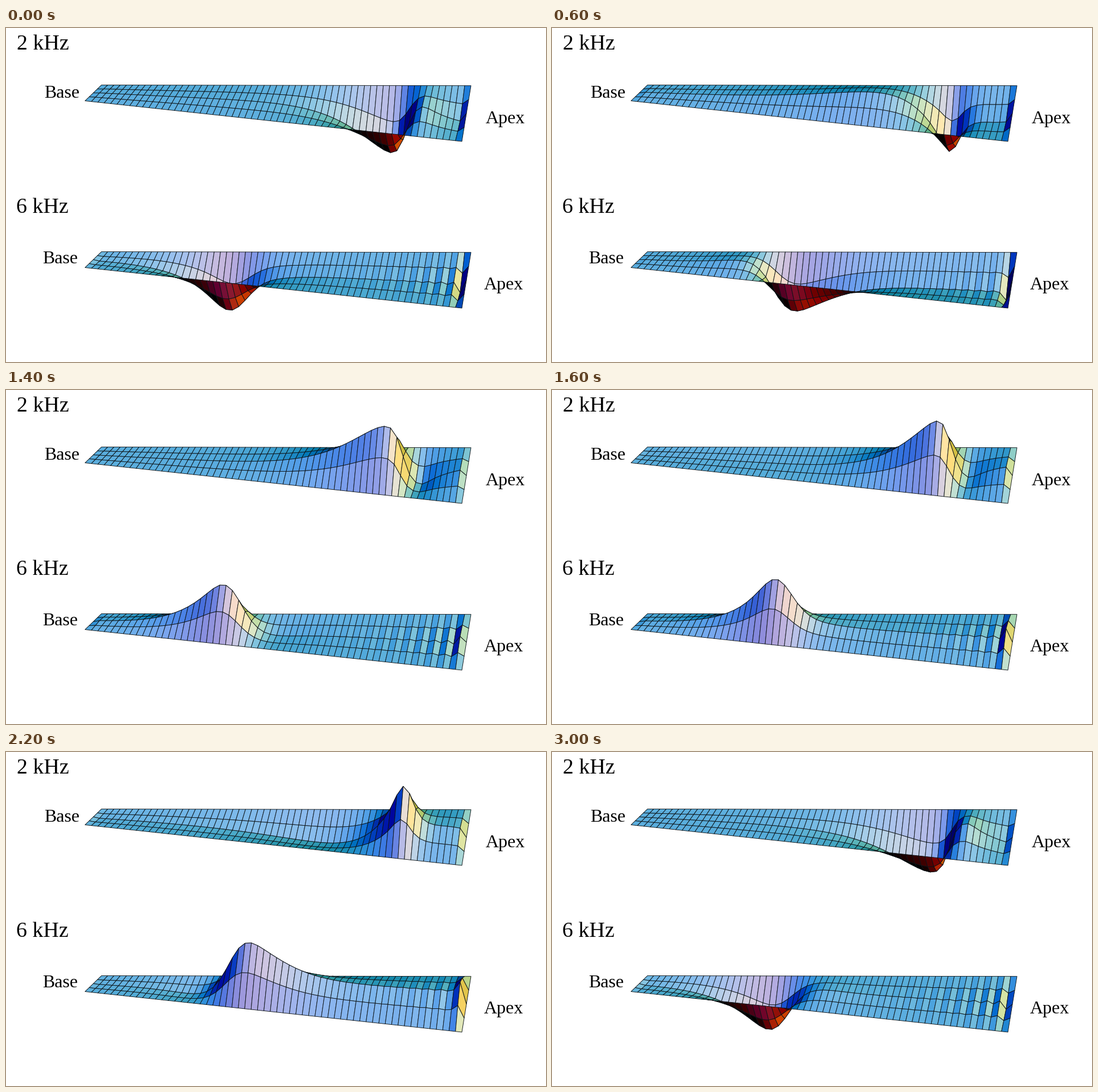
These frames come from a looping animation (950x589 px, 3.2 s). A matplotlib script:

```python
import numpy as np
import matplotlib.pyplot as plt
from matplotlib.animation import FuncAnimation
from matplotlib.collections import PolyCollection

W, H, DPI = 950, 589, 64
FRAMES, STEP = 16, 200
PERIOD = FRAMES * STEP
PX = 72 / DPI                      # points per pixel

COLS, ROWS = 59, 4
FLAT_DEPTH, LIFT_DEPTH = 1.4, 0.2  # depth gained per pixel down / per pixel of lift

# Red, green and blue lights in camera axes (right, up, towards the viewer)
LIGHTS = np.array([[0.80, -0.10, 0.75],
                   [0.55, 0.40, 0.61],
                   [-0.05, 0.50, 0.79]])

u = np.linspace(0, 1, COLS + 1)             # base to apex
v = np.linspace(0, 1, ROWS + 1)[:, None]    # back to front
PROFILE = np.sin(np.pi * v) ** 1.67


def sigmoid(x):
    return 1 / (1 + np.exp(-x))


def swing(t, crest):
    return np.cos(2 * np.pi * (t - crest) / PERIOD)


class Membrane:
    """Strip carrying a travelling wave that peaks near one place and then dies."""

    def __init__(self, ax, top, wave, delay, tail, ripple=0, tip=0):
        self.top, self.ripple, self.tip = top, ripple, tip

        size, place, rise, fall = wave
        d = u - place
        self.amp = size / (np.exp(-d / rise) + np.exp(d / fall))

        start, ramp, jump, centre, width = delay
        self.crest = (start + ramp * np.exp(d / rise)
                      + jump * sigmoid((u - centre) / width))

        size, centre, width, end, lead = tail
        self.tail_amp = size * sigmoid((u - centre) / width)
        self.tail_crest = end + lead * (1 - u)

        self.mesh = PolyCollection([], edgecolors="#0b1216", linewidths=0.9 * PX,
                                   joinstyle="round")
        ax.add_collection(self.mesh)

    def height(self, t):
        h = self.amp * swing(t, self.crest) + self.tail_amp * swing(t, self.tail_crest)
        m = np.arange(COLS, -1, -1)
        h += self.ripple * 0.85 ** m * (-1.0) ** m * swing(t, 2800)
        h[-2] += self.tip * swing(t, 2000)
        h[0] = h[-1] = 0
        return h + 0.0009 * h * h          # nearer when raised, so a little larger

    def points(self, t):
        back_x, back_y = 168 + 650 * u, self.top + 1.2 * u
        front_x, front_y = 139 + 663 * u, self.top + 28 + 71.5 * u
        x = back_x + v * (front_x - back_x)
        y = back_y + v * (front_y - back_y)
        lift = PROFILE * self.height(t)
        depth = FLAT_DEPTH * (y - self.top) + LIFT_DEPTH * lift
        return np.stack([x, lift - y, depth], axis=-1)

    def draw(self, t):
        p = self.points(t)
        a, b, c, d = p[:-1, :-1], p[:-1, 1:], p[1:, 1:], p[1:, :-1]
        normal = np.cross(c - a, b - d)
        normal /= np.linalg.norm(normal, axis=-1, keepdims=True)
        normal *= np.where(normal[..., 2:] < 0, -1, 1)
        color = np.clip(normal @ LIGHTS.T, 0, 1)
        quads = np.stack([a, b, c, d], axis=2)[..., :2] * [1, -1]
        self.mesh.set_verts(quads.reshape(-1, 4, 2))
        self.mesh.set_facecolor(color.reshape(-1, 3))


fig = plt.figure(figsize=(W / DPI, H / DPI), dpi=DPI, facecolor="white")
ax = fig.add_axes([0, 0, 1, 1])
ax.set(xlim=(0, W), ylim=(H, 0))
ax.axis("off")


def label(x, y, text, size):
    ax.text(x, y, text, fontsize=size * PX, family="Liberation Serif",
            color="black", va="baseline")


label(19, 38, "2 kHz", 38)
label(67, 123, "Base", 32)
label(844, 168, "Apex", 32)
label(18, 326, "6 kHz", 38)
label(64, 415, "Base", 32)
label(841, 461, "Apex", 32)

low = Membrane(ax, 100.5,
               wave=(115, 0.855, 0.2, 0.018),
               delay=(600, 1400, 320, 0.825, 0.012),
               tail=(18, 0.875, 0.008, 1850, 5500))
high = Membrane(ax, 394.5,
                wave=(172, 0.39, 0.088, 0.08),
                delay=(1250, 0, 1050, 0.375, 0.035),
                tail=(22, 0.46, 0.03, 2230, 0),
                ripple=5, tip=18)


def update(i):
    for strip in (low, high):
        strip.draw(i * STEP)
    return low.mesh, high.mesh


anim = FuncAnimation(fig, update, frames=FRAMES, interval=STEP, repeat=True,
                     repeat_delay=0, blit=False)
plt.show()
```
